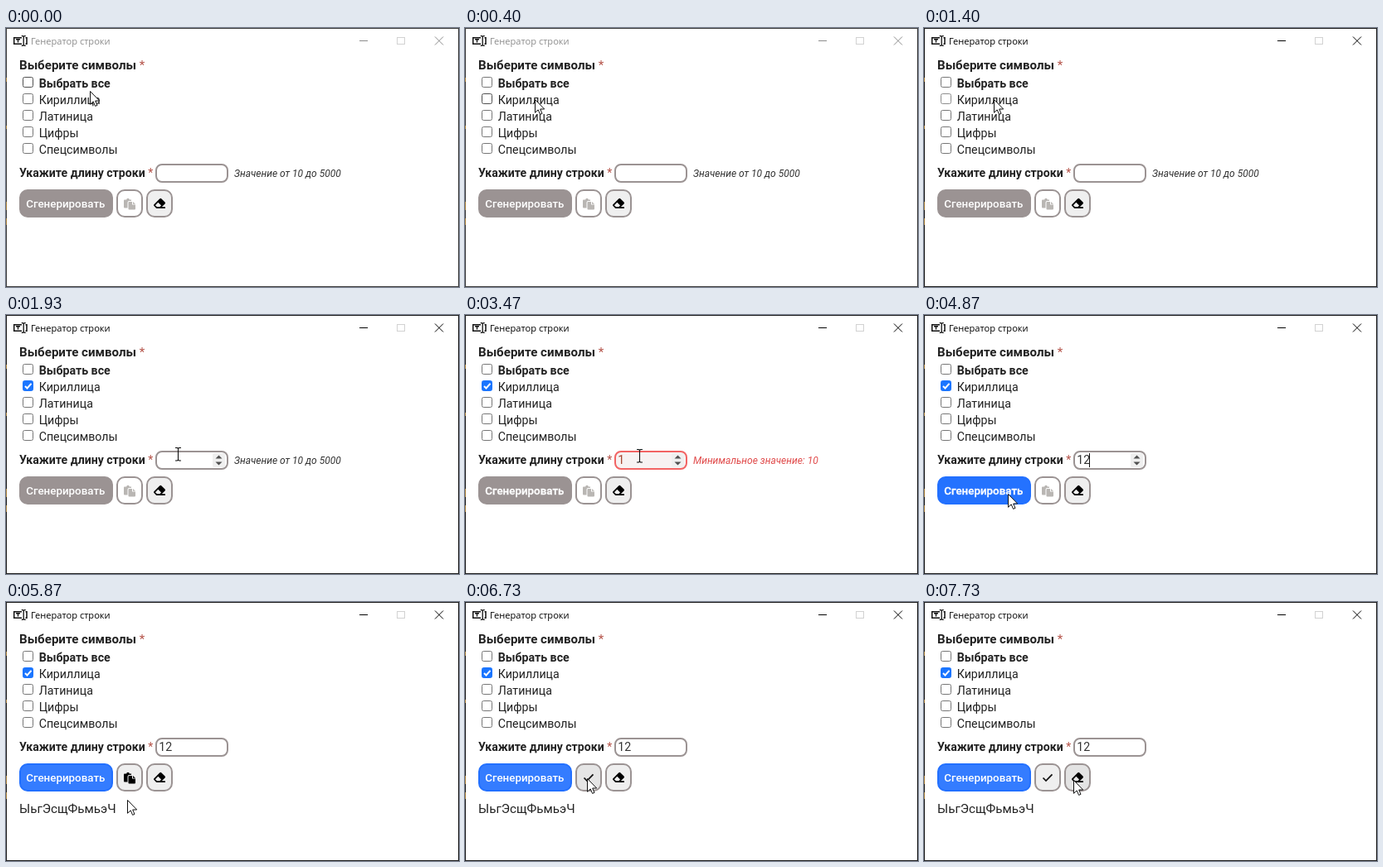
An HTML page for the animation above (8 s loop, 546 px wide and 313 px high).

```html
<!DOCTYPE html>
<html lang="ru">
<head>
<meta charset="utf-8">
<title>Генератор строки</title>
<style>
html, body { margin: 0; width: 100%; height: 100%; overflow: hidden; background: #fff; }
svg { display: block; }
text { font-family: Roboto, sans-serif; font-size: 14.2px; fill: #222; white-space: pre; }
.bold { font-weight: 700; }
.star { fill: #b5544a; }
.title { font-family: "Open Sans", "Noto Sans", sans-serif; font-size: 11.1px; }
.hint { font-size: 12px; font-style: italic; }
.btn { font-size: 13.33px; font-weight: 500; fill: #fff; }
</style>
</head>
<body>
<svg width="546" height="313" viewBox="0 0 546 313">
  <rect width="546" height="313" fill="#fff"/>
  <rect id="frame" x=".5" y=".5" width="545" height="312" fill="none"/>
  <path d="M.5 60v5M.5 118v4M.5 210v10M.5 230v8" stroke="#a8803a"/>

  <g fill="none" stroke="#111" stroke-width="1.5">
    <path d="M19 11.7H9.7V19.3H19M23.5 11.7H25V19.3H23.5"/>
    <path d="M12 13.7H17M14.5 13.7V17.6" stroke-width="1.4"/>
    <path d="M18.7 9.7H20.2L21.2 10.5L22.2 9.7H23.7M21.2 10.5V20.5M18.7 21.3H20.2L21.2 20.5L22.2 21.3H23.7" stroke-width="1.3"/>
  </g>
  <text id="title" class="title" x="30" y="20">Генератор строки</text>
  <path id="controls" d="M426 15.5H436M517 10.5L527 20.5M527 10.5L517 20.5" fill="none"/>
  <rect x="471.5" y="11.5" width="9" height="8" fill="none" stroke="#d2d2d2"/>

  <text class="bold" x="16" y="50" style="font-size:15.1px">Выберите символы<tspan class="star" font-weight="400"> *</tspan></text>
  <g id="rows"></g>

  <text class="bold" x="16" y="180" style="font-size:14.1px">Укажите длину строки<tspan class="star" font-weight="400"> *</tspan></text>
  <rect id="field" x="181" y="165" width="86" height="21" rx="7" stroke-width="2"/>
  <g id="spin">
    <rect x="249" y="167" width="15" height="17" rx="2" fill="#efefef"/>
    <path d="M252.5 173.5L256.5 169.5L260.5 173.5ZM252.5 177.5L256.5 181.5L260.5 177.5Z" fill="#505050"/>
  </g>
  <text id="value" x="184.3" y="180"></text>
  <rect id="caret" y="167" width="1" height="17" fill="#111"/>
  <text id="hint" class="hint" x="275" y="180"></text>

  <rect id="go" x="17" y="196" width="111" height="32" rx="9" stroke-width="2"/>
  <text id="goText" class="btn" x="24.3" y="217">Сгенерировать</text>

  <rect id="copy" x="134" y="196" width="30" height="32" rx="9" stroke="#9b9393" stroke-width="2"/>
  <g id="pages">
    <path d="M143 207.5h2.2a1.8 1.8 0 0 1 3.6 0h2.2v1.5h-2.5q-2 0-2 2v6.5h-3.5q-1 0-1-1v-8q0-1 1-1Z"/>
    <path d="M148.5 210h3.5v3.5h4v5q0 1-1 1h-6.500q-1 0-1-1v-7.500q0-1 1-1ZM153 210l3 2.700h-3Z"/>
  </g>
  <path id="tick" d="M143.500 212.500L147 216L154.500 208.300" fill="none" stroke="#111" stroke-width="1.700"/>

  <rect id="erase" x="170" y="196" width="30" height="32" rx="9" stroke="#9b9393" stroke-width="2"/>
  <path transform="translate(178 205) scale(.0273)" fill-rule="evenodd"
    d="M498 274a48 48 0 0 0 0-68L338 46a48 48 0 0 0-68 0L14 302a48 48 0 0 0 0 68l96 96a48 48 0 0 0 34 14H500q12 0 12-12V428q0-12-12-12H356ZM195 211L333 349L265 416H151L71 336Z"/>

  <text id="result" x="16" y="255" style="font-size:15.2px">ЫьгЭсщФьмьэЧ</text>

  <path id="arrow" d="M.5 .5V16.300L4.200 12.900L6.600 18.400L9 17.400L6.700 12H11.700Z" fill="#fff" stroke="#111" stroke-linejoin="round"/>
  <path id="beam" d="M-3 -7.500H-.5L.5 -6.500L1.500 -7.500H4M.5 -6.500V7M-3 8H-.5L.5 7L1.500 8H4" fill="none" stroke="#111" stroke-width="1.100"/>
</svg>
<script>
const LOOP = 8000, TICK = 1000 / 15;
const $ = id => document.getElementById(id);
const set = (id, attrs) => { for (const k in attrs) $(id).setAttribute(k, attrs[k]); };
const show = (id, on) => set(id, { visibility: on ? "visible" : "hidden" });

const labels = ["Выбрать все", "Кириллица", "Латиница", "Цифры", "Спецсимволы"];
$("rows").innerHTML = labels.map((s, i) => {
  const y = 59.5 + i * 20;
  return `<rect id="box${i}" x="20.5" y="${y}" width="12" height="12" rx="2"/>` +
    `<text x="39.700" y="${y + 12.5}"${i ? "" : ' class="bold"'}>${s}</text>`;
}).join("") + '<path id="mark" d="M23 86L25.500 88.500L30.500 82.800" fill="none" stroke="#fff" stroke-width="2"/>';

// Times below are in ticks of 1/15 s
const ACTIVE = 21, CHECK = 22, FOCUS = 31, KEY1 = 44, KEY2 = 57, BLUR = 79, DONE = 80, COPIED = 101;

// Pointer stops: tick, x, y
const path = [
  [0, 101, 76], [6, 84, 86], [24, 84, 86], [29, 207, 168], [34, 207, 168], [36, 210, 170],
  [64, 210, 170], [69, 102, 219], [71, 102, 219], [73, 101, 216], [82, 101, 216],
  [84, 145, 239], [87, 145, 239], [88, 146, 239], [96, 146, 239], [98, 147, 213],
  [101, 147, 213], [104, 167, 237], [113, 167, 237], [116, 180, 215], [120, 180, 215]
];

function pointer(n) {
  const i = Math.max(1, path.findIndex(p => p[0] >= n));
  const [a, x0, y0] = path[i - 1], [b, x1, y1] = path[i];
  const u = (n - a) / (b - a), e = u * u * (3 - 2 * u);
  return [Math.round(x0 + (x1 - x0) * e), Math.round(y0 + (y1 - y0) * e)];
}

function render(ms) {
  const n = Math.min(119, Math.floor((ms + 5) / TICK));
  const [x, y] = pointer(n);
  const over = (l, t, r, b) => x >= l && x < r && y >= t && y < b;

  const active = n >= ACTIVE;
  set("frame", { stroke: active ? "#1c1c1c" : "#3c3c3c" });
  $("title").style.fill = active ? "#000" : "#8c8c8c";
  set("controls", { stroke: active ? "#000" : "#8c8c8c" });

  labels.forEach((_, i) => {
    const hover = over(16, 57 + i * 20, 140, 77 + i * 20);
    const on = i === 1 && n >= CHECK;
    const line = on ? (hover ? "#0f62d8" : "#1a75ff") : n === ACTIVE && hover ? "#8d8d8d" : hover ? "#4f4f4f" : "#767676";
    set("box" + i, { fill: on ? line : "#fff", stroke: line });
  });
  show("mark", n >= CHECK);

  const focus = n >= FOCUS && n < BLUR;
  const bad = n >= KEY1 && n < KEY2;
  const text = n >= KEY2 ? "12" : bad ? "1" : "";
  const inField = over(180, 164, 268, 187);
  set("field", { stroke: bad ? "#f26464" : "#9b9393", fill: bad ? "#f7f2f2" : "#fff" });
  show("spin", inField || focus);
  $("value").textContent = text;
  $("value").style.fill = bad ? "#a5452f" : "#333";
  const last = n >= KEY2 ? KEY2 : n >= KEY1 ? KEY1 : FOCUS;
  show("caret", focus && Math.floor((n - last) / 8) % 2 === 0);
  set("caret", { x: Math.round(184 + text.length * 7.7) });
  $("hint").textContent = n < KEY1 ? "Значение от 10 до 5000" : bad ? "Минимальное значение: 10" : "";
  $("hint").style.fill = bad ? "#e04a4a" : "#333";

  const ready = n >= KEY2;
  const goHover = over(16, 195, 129, 229);
  set("go", {
    fill: !ready ? "#9b9393" : goHover ? "#2472ff" : "#347cff",
    stroke: ready ? "#2270ff" : "#9b9393"
  });
  set("goText", { stroke: "#fff", "stroke-width": focus ? .3 : 0 });

  const done = n >= DONE, copied = n >= COPIED;
  set("copy", { fill: !done ? "#fff" : over(133, 195, 165, 229) ? "#e5e5e5" : "#efefef" });
  set("pages", { fill: done ? "#000" : "#b9b6b3" });
  show("pages", !copied);
  show("tick", copied);
  set("erase", { fill: over(169, 195, 201, 229) ? "#e3e3e3" : "#efefef" });
  show("result", done);

  show("beam", inField);
  show("arrow", !inField);
  set(inField ? "beam" : "arrow", { transform: `translate(${x} ${y})` });
}

const start = performance.now();
function loop() {
  render((performance.now() - start) % LOOP);
  requestAnimationFrame(loop);
}
render(0);
requestAnimationFrame(loop);
</script>
</body>
</html>
```
